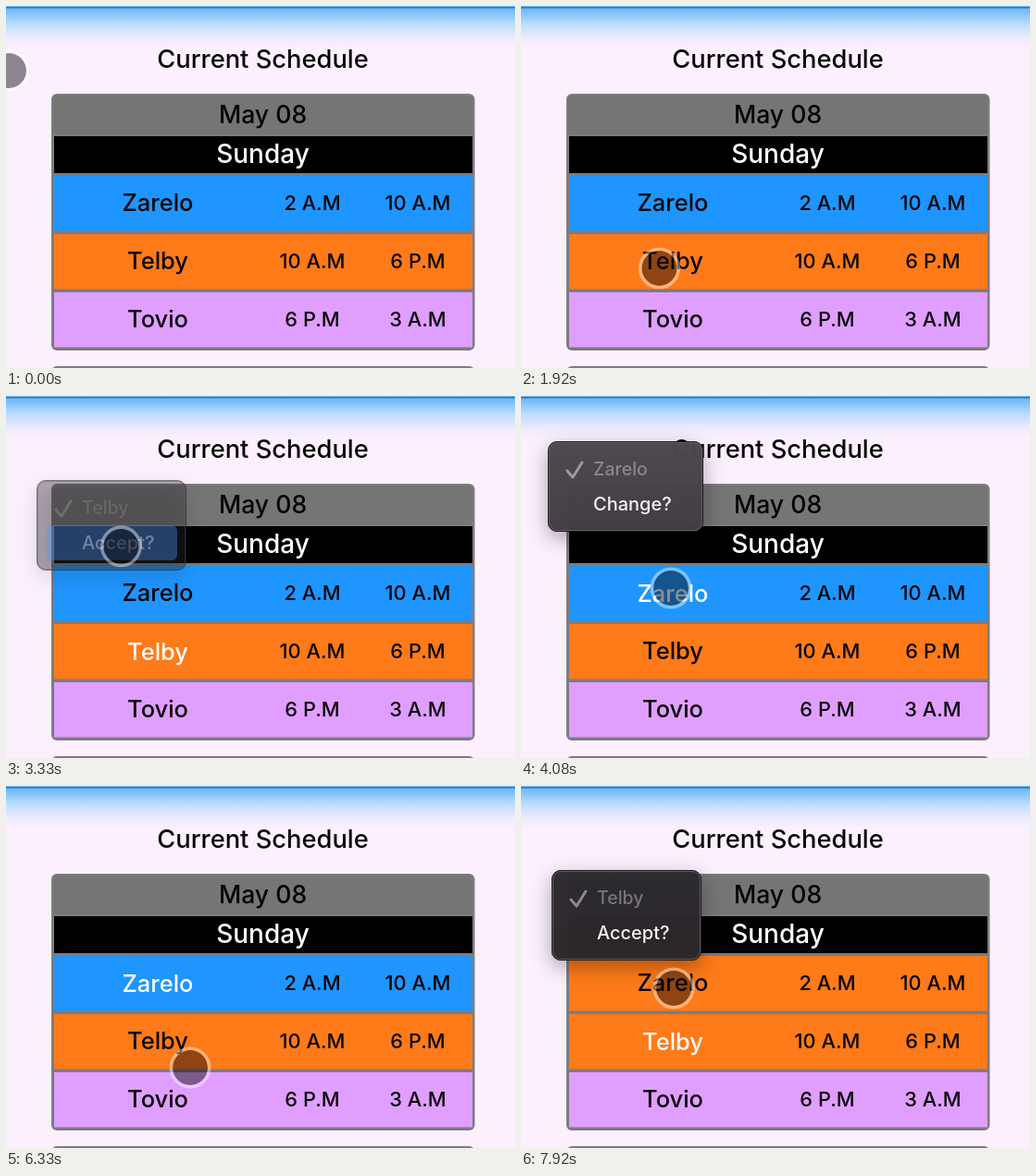
An HTML page with a canvas for the animation above (8000 ms loop, 550 px wide and 392 px high).

```html
<!DOCTYPE html>
<html lang="en">
<head>
<meta charset="utf-8">
<title>Schedule</title>
<style>
  html, body { margin: 0; width: 100%; height: 100%; overflow: hidden; background: #fcf0fe; }
  canvas { display: block; width: 550px; height: 392px; }
</style>
</head>
<body>
<canvas width="550" height="392"></canvas>
<script>
const ctx = document.querySelector('canvas').getContext('2d');
const LOOP = 8000;
const BLUE = '#1e95ff', ORANGE = '#ff7a18', VIOLET = '#e09eff';
const BORDER = '#7d7b7e', HEADER = '#757575';

// Pointer stops: time, x, y
const path = [
  [0, 3, 70], [80, 3, 70], [760, 176, 222], [1080, 214, 257], [1560, 150, 284],
  [2620, 148, 284], [3030, 122, 160], [3260, 122, 160], [3740, 162, 208],
  [4200, 162, 208], [4680, 126, 116], [5330, 126, 116], [5950, 190, 288],
  [6330, 199, 305], [6800, 148, 284], [7600, 148, 284], [7920, 165, 219], [8000, 158, 200],
];

const rows = [
  { name: 'Zarelo', from: '2 A.M', to: '10 A.M', y: 184, color: BLUE },
  { name: 'Telby', from: '10 A.M', to: '6 P.M', y: 247, color: ORANGE },
  { name: 'Tovio', from: '6 P.M', to: '3 A.M', y: 310, color: VIOLET },
];

const menus = [
  { row: 1, action: 'Accept?', open: 2250, hover: 2940, close: 3200 },
  { row: 0, action: 'Change?', open: 3900, hover: 4560, close: 5135 },
  { row: 1, action: 'Accept?', open: 7150, hover: Infinity, close: Infinity },
];
const menuBoxes = [
  { x: 29, y: 49, w: 168, h: 98, top: '#4d464f', bottom: '#433d45' },
  { x: 33, y: 91, w: 162, h: 98, top: '#2d2a30', bottom: '#2b272a' },
];
const SHIFT_TAKEN = 6500, FADE = 210;

const clamp = v => Math.max(0, Math.min(1, v));
const ease = u => u * u * (3 - 2 * u);

function pointerAt(t) {
  const i = Math.max(1, path.findIndex(p => p[0] > t));
  const [t0, x0, y0] = path[i - 1], [t1, x1, y1] = path[i];
  const u = ease((t - t0) / (t1 - t0));
  return [x0 + (x1 - x0) * u, y0 + (y1 - y0) * u];
}

function box(x, y, w, h, r, fill) {
  ctx.beginPath();
  ctx.roundRect(x, y, w, h, r);
  ctx.fillStyle = fill;
  ctx.fill();
}

function text(str, x, y, size, color = '#050505', align = 'center') {
  ctx.font = `500 ${size}px Inter, "Open Sans", sans-serif`;
  ctx.textAlign = align;
  ctx.fillStyle = color;
  ctx.fillText(str, x, y);
}

function verticalGradient(y0, y1, ...stops) {
  const g = ctx.createLinearGradient(0, y0, 0, y1);
  stops.forEach(([at, color]) => g.addColorStop(at, color));
  return g;
}

function drawPage(t) {
  box(0, 0, 550, 392, 0, '#fcf0fe');
  box(0, 0, 550, 46, 0, verticalGradient(0, 46,
    [0, '#62b2fa'], [.12, '#78bdfb'], [.42, '#bcdcfc'], [.75, '#ecebfe'], [1, '#fcf0fe']));
  box(0, 1, 550, 1.6, 0, '#3d74a8');
  text('Current Schedule', 277.5, 67, 27.3);

  box(49, 95, 457.5, 278, 6, BORDER);
  box(51, 97, 453.5, 42, 4, HEADER);
  box(52, 141, 452, 40, 0, '#000');
  text('May 08', 277.5, 127, 26.6);
  text('Sunday', 277.5, 170, 28, '#fff');

  const focused = menus.filter(m => t >= m.open).pop()?.row;
  rows.forEach((row, i) => {
    const taken = i === 0 && t >= SHIFT_TAKEN;
    const active = i === focused;
    box(52, row.y, 452, 59.5, 0, taken ? ORANGE : row.color);
    text(row.name, 164, row.y + 38 + active, 25.5, active ? '#fff' : '#050505');
    text(row.from, 331, row.y + 37, 21.8);
    text(row.to, 445, row.y + 37, 21.8);
  });
  box(49, 390, 457.5, 40, 6, BORDER);
}

function drawMenu(menu, t) {
  if (t < menu.open || t > menu.close + FADE) return;
  const { x, y, w, h, top, bottom } = menuBoxes[menu.row];
  ctx.save();
  ctx.globalAlpha = .98 * (1 - clamp((t - menu.close) / FADE));

  ctx.save();
  ctx.shadowColor = 'rgba(0,0,0,.34)';
  ctx.shadowBlur = 22;
  ctx.shadowOffsetY = 7;
  box(x, y, w, h, 10, verticalGradient(y, y + h, [0, top], [1, bottom]));
  ctx.restore();

  ctx.lineWidth = 1;
  for (const [inset, color] of [[.5, '#1d1a1e'], [1.5, '#605c63']]) {
    ctx.beginPath();
    ctx.roundRect(x + inset, y + inset, w - 2 * inset, h - 2 * inset, 10 - inset);
    ctx.strokeStyle = color;
    ctx.stroke();
  }

  if (t >= menu.hover) box(x + 11, y + 49, w - 21, 38, 6, '#4a98ff');

  const muted = 'rgba(255,255,255,.36)';
  ctx.beginPath();
  ctx.moveTo(x + 21, y + 32);
  ctx.lineTo(x + 27, y + 39);
  ctx.lineTo(x + 37, y + 23);
  ctx.strokeStyle = 'rgba(255,255,255,.46)';
  ctx.lineWidth = 3;
  ctx.lineCap = ctx.lineJoin = 'round';
  ctx.stroke();
  text(rows[menu.row].name, x + 49, y + 37, 19.5, muted, 'left');
  text(menu.action, x + 49, y + 75, 20, '#f7f5f7', 'left');
  ctx.restore();
}

function drawPointer(t) {
  const [x, y] = pointerAt(t);
  ctx.beginPath();
  ctx.arc(x, y, 19, 0, 7);
  ctx.fillStyle = 'rgba(10,8,12,.46)';
  ctx.fill();
  ctx.beginPath();
  ctx.arc(x, y, 20.7, 0, 7);
  ctx.strokeStyle = 'rgba(255,255,255,.42)';
  ctx.lineWidth = 3.6;
  ctx.stroke();
}

function draw(now) {
  const t = now % LOOP;
  drawPage(t);
  menus.forEach(menu => drawMenu(menu, t));
  drawPointer(t);
}

const start = performance.now();
function tick() {
  draw(performance.now() - start);
  requestAnimationFrame(tick);
}
tick();
</script>
</body>
</html>
```
